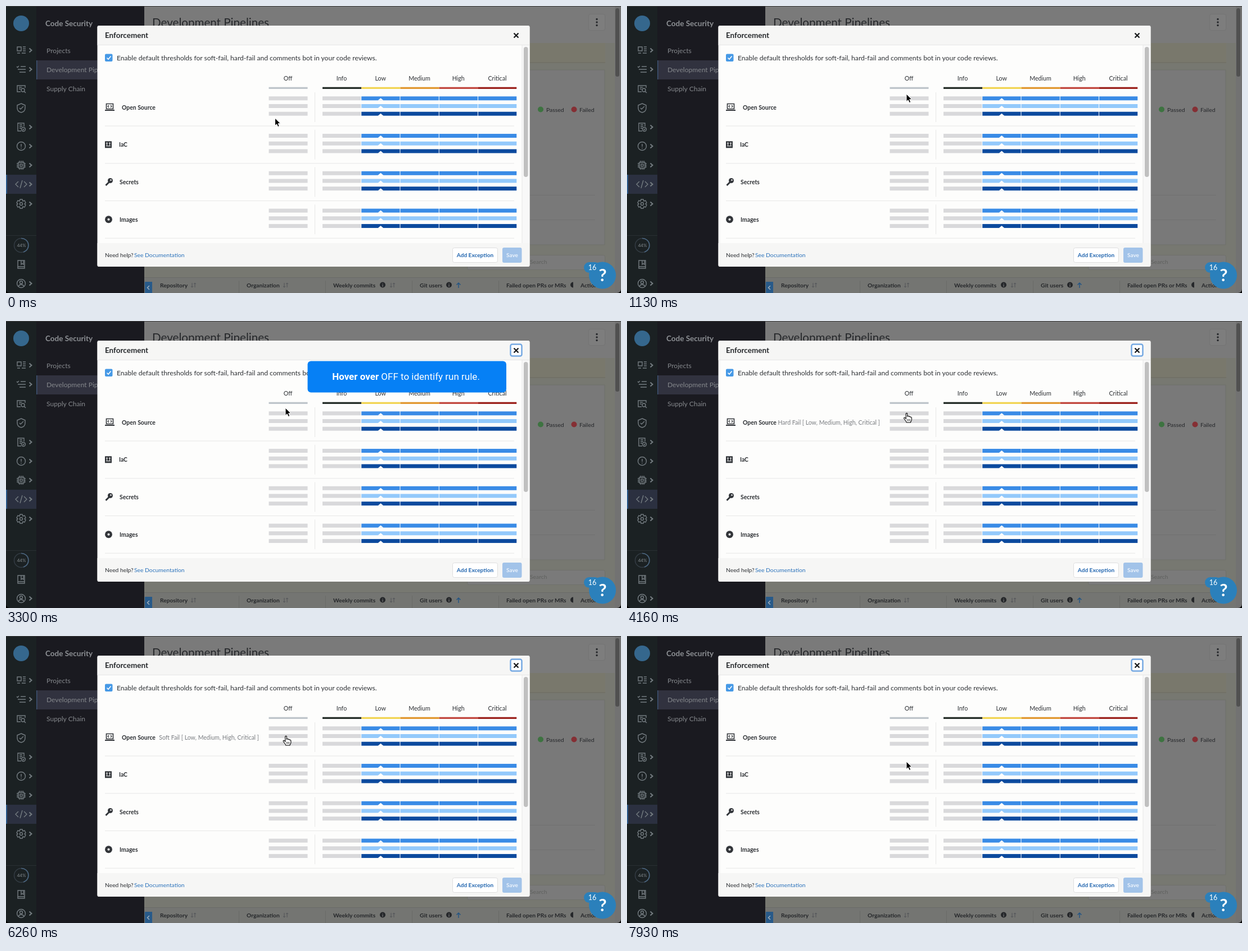
These frames come from a looping animation (1094x512 px, 8000 ms). An HTML page:

```html
<!DOCTYPE html>
<html lang="en">
<head>
<meta charset="utf-8">
<title>Enforcement thresholds</title>
<style>
  html, body { margin: 0; width: 100%; height: 100%; overflow: hidden; background: #000; }
  svg { display: block; width: 100vw; height: 100vh; font-family: Lato, "Open Sans", sans-serif; }
  .icon { fill: none; stroke: #747c81; stroke-width: 1.4; }
</style>
</head>
<body>
<svg id="stage" viewBox="0 0 1094 512" xmlns="http://www.w3.org/2000/svg"></svg>
<script>
const LOOP = 8000;
const stage = document.getElementById('stage');

const rect = (x, y, w, h, fill, extra = '') =>
  `<rect x="${x}" y="${y}" width="${w}" height="${h}" fill="${fill}" ${extra}/>`;
const circle = (x, y, r, fill, extra = '') =>
  `<circle cx="${x}" cy="${y}" r="${r}" fill="${fill}" ${extra}/>`;
const path = (d, extra = '') => `<path d="${d}" ${extra}/>`;
const text = (x, y, size, fill, str, extra = '') =>
  `<text x="${x}" y="${y}" font-size="${size}" fill="${fill}" ${extra}>${str}</text>`;
const bold = 'font-weight="700"';
const middle = 'text-anchor="middle"';
const at = (x, y, body) => `<g transform="translate(${x} ${y})">${body}</g>`;
const stroke = (color, width = 1) => `fill="none" stroke="${color}" stroke-width="${width}"`;

function sidebar() {
  const icons = [
    [79, 1, path('M-7-6H0V1H-7ZM3-6H8M3-2.500H8M3 1H8M-7 5H-2M1 5H8')],
    [113, 1, path('M-8-5l1.500 1.500L-4-6M-1-5H8M-6 0H8M-3 5H8')],
    [148, 0, path('M7-2V-6H-7V5H-1M-4-3H1M-4 0H-1') + circle(3, 2, 3, 'none') + path('M5 4L8 7')],
    [182, 0, path('M0-8L7-5V0C7 4 4 7 0 8C-4 7-7 4-7 0V-5ZM-3 0L-1 2L4-3')],
    [216, 1, path('M5-1V-7H-6V7H0M-3-4H2M-3-1H2M-3 2H0') + circle(4, 4, 3.500, 'none') + path('M2.500 4l1 1 2-2')],
    [250, 1, circle(0, 0, 7.500, 'none') + path('M0-4V1M0 2.700V4.200')],
    [284, 1, rect(-5, -5, 10, 10, 'none') + rect(-2, -2, 4, 4, 'none') +
      path('M-3-8V-5M0-8V-5M3-8V-5M-3 5V8M0 5V8M3 5V8M-8-3H-5M-8 0H-5M-8 3H-5M5-3H8M5 0H8M5 3H8')],
    [318, 1, path('M-5-5L-10 0L-5 5M5-5L10 0L5 5M2-7L-2 7')],
    [353, 1, path('M-2-8H2L3-5L6-6L8-2L6 0L8 2L6 6L3 5L2 8H-2L-3 5L-6 6L-8 2L-6 0L-8-2L-6-6L-3-5Z') + circle(0, 0, 2.500, 'none')],
    [461, 0, path('M-6-7H6V7H-6ZM-6 4H6M0-7V0L2-1.500L4 0V-7')],
    [495, 1, circle(0, 0, 7.500, 'none') + circle(0, -2, 2.500, 'none') + path('M-5 5C-3 1 3 1 5 5')]
  ];
  const chevron = path('M14.500-3.500L18.500 0L14.500 3.500', 'stroke-width="2"');
  return rect(0, 0, 55, 512, '#1b2123') + rect(54, 0, 192, 512, '#1a1a20') +
    rect(0, 301, 54, 34, '#2b3040') + rect(0, 301, 2, 34, '#305d8e') +
    rect(54, 97, 192, 34, '#31323f') + rect(54, 97, 1.500, 34, '#3d5374') +
    rect(0, 409, 54, 1, '#2a3033') +
    circle(27, 31, 14, '#35678d') +
    `<g class="icon">${icons.map(([y, arrow, body]) => at(27, y, body + (arrow ? chevron : ''))).join('')}</g>` +
    circle(27, 427, 12.500, 'none', 'stroke="#343c44" stroke-width="1.500"') +
    path('M27 414.500A12.500 12.500 0 0 1 31 439', stroke('#4b6680', 1.500)) +
    text(27.500, 430, 8, '#83898d', '44%', middle) +
    text(70, 36, 13.500, '#8d9094', 'Code Security', bold) +
    text(72, 84, 12.100, '#85888c', 'Projects') +
    text(72, 118, 12.100, '#85888c', 'Development Pipelines') +
    text(72, 152, 12.100, '#85888c', 'Supply Chain');
}

function page() {
  const ink = '#25272a';
  const sort = x => path(`M${x} 494V502M${x - 2} 500L${x} 502L${x + 2} 500M${x + 5} 502V494M${x + 3} 496L${x + 5} 494L${x + 7} 496`, stroke('#515356'));
  const info = x => circle(x, 497.500, 5, ink) + text(x, 501, 8, '#8a8a8a', 'i', bold + middle.replace(/^/, ' '));
  const head = [[274, 'Repository'], [428, 'Organization'], [582, 'Weekly commits'],
    [736, 'Git users'], [890, 'Failed open PRs or MRs'], [1022, 'Actions']];
  return rect(246, 0, 848, 512, '#777871') + rect(246, 0, 848, 66, '#7a7a7a') +
    rect(246, 66, 820, 35, '#79786c') + rect(246, 100.500, 820, 1, '#6c6b60') +
    rect(260, 114, 805, 312, '#797979', 'stroke="#6f706b"') +
    rect(260, 337, 788, 1, '#717171') + rect(260, 381, 788, 1, '#717171') +
    text(260, 37, 20.600, ink, 'Development Pipelines') +
    rect(1036.500, 14.500, 29, 29, '#7d7d7d', 'rx="3" stroke="#737373"') +
    [23.500, 29, 34.500].map(y => circle(1051, y, 1.700, ink)).join('') +
    circle(951, 184.500, 5, '#3d7340') + text(961, 188.500, 10.400, ink, 'Passed') +
    circle(1010.500, 184.500, 5, '#852f34') + text(1020, 188.500, 10.400, ink, 'Failed') +
    rect(820.500, 444.500, 245, 26, '#7a7a7a', 'rx="3" stroke="#6f706b"') + text(932, 460, 10.400, '#5f605e', 'Search') +
    rect(246, 484, 838, 28, '#747572') + rect(246, 484, 838, 1, '#696a67') +
    [414, 568, 722, 876].map(x => rect(x, 490, 1, 22, '#696a67')).join('') +
    head.map(([x, s]) => text(x, 502, 10.200, ink, s, bold)).join('') +
    sort(331) + sort(495) + sort(685) + info(670) + info(788) +
    path('M805 503V494M801.500 497.500L805 494L808.500 497.500', stroke('#245584', 1.500)) +
    path('M1009 492.500A5 5 0 0 0 1009 502.500Z', `fill="${ink}"`) +
    rect(247, 492, 13, 20, '#285a89') + path('M255 499L251.500 502.500L255 506', stroke('#a0adba', 1.500)) +
    rect(1083, 0, 11, 512, '#727272') + rect(1084, 4, 7, 122, '#505050', 'rx="3.500"');
}

function helpBubble() {
  return circle(1061, 480.500, 24, '#2b80bb') +
    rect(1028, 457, 29, 19, '#2b80bb', 'rx="9.500"') +
    text(1043, 471, 12.500, '#fff', '16', middle) +
    text(1061.500, 491, 31, '#fff', '?', `${bold} ${middle}`);
}

const columns = [['Info', '#202823'], ['Low', '#f1d34e'], ['Medium', '#e0952b'], ['High', '#c0433a'], ['Critical', '#991c17']];
const levels = ['#398be6', '#93c9fb', '#0c4a9e'];
const rows = ['Open Source', 'IaC', 'Secrets', 'Images'];
const rowIcons = [
  path('M178.500 174.500H190.500V183.500H178.500Z', stroke('#33363a', 1.600)) + rect(176, 185, 17, 2, '#33363a') +
    path('M183 177L181 179L183 181M186 177L188 179L186 181', stroke('#33363a', 1.200)),
  rect(176, 174.500, 12, 12, '#33363a') + path('M178 183H186M179.500 182V177M178 178.500L179.500 177L181 178.500M184.500 182V177M183 178.500L184.500 177L186 178.500', stroke('#fff')),
  circle(185.500, 178, 4.500, '#33363a') + path('M184 180L177.500 186.500', stroke('#33363a', 3)) + circle(186.500, 177, 1.300, '#fff'),
  circle(182.500, 180.500, 6.500, '#33363a') + circle(182.500, 180.500, 2, '#fff')
];
const nameX = [206, 201, 202, 202];
const colX = i => 563 + i * 69.250;
const barY = i => 161.300 + i * 13.700;

function thresholdRow(name, r) {
  const bars = levels.map((color, i) => {
    const y = barY(i);
    const cells = columns.map((_, c) => rect(colX(c), y, 68.250, 7, c ? color : '#d9d9db')).join('');
    return rect(467.500, y, 69, 7, '#d9d9db') + cells +
      path(`M661.500 ${y + 7.200}L666.500 ${y + 3}L671.500 ${y + 7.200}Z`, 'fill="#fdfdfd"');
  }).join('');
  return at(0, r * 66.750, rowIcons[r] +
    text(nameX[r], 184.500, 10.400, '#2c2f33', name, bold) + bars +
    rect(549, 154, 1, 53, '#e6e6e6') + rect(176, 213.500, 728, 1, '#e8e8e8'));
}

function modal() {
  return rect(162.500, 35, 769, 430, '#fdfdfc', 'rx="3"') +
    path('M162.500 69.500V38a3 3 0 0 1 3-3H928.500a3 3 0 0 1 3 3V69.500Z', 'fill="#f6f6f5"') +
    rect(162.500, 69, 769, 1, '#e6e6e6') +
    rect(918, 70, 13.500, 353, '#f8f8f8') + rect(917.500, 70, 1, 353, '#e8e8e8') +
    rect(921, 73, 7.500, 232, '#c0c0c0', 'rx="3.750"') +
    text(176, 56.500, 13.500, '#26292c', 'Enforcement', bold) +
    '<rect id="focus" x="897.500" y="41.500" width="20" height="21" rx="3" fill="#fff" stroke="#76a9e2" stroke-width="2.500"/>' +
    path('M903.500 48.500L911.500 56.500M911.500 48.500L903.500 56.500', stroke('#17191b', 2.300)) +
    rect(176, 85.500, 13.500, 13.500, '#4699e6', 'rx="2"') +
    path('M179.500 92.500L182 95L186.500 89.500', stroke('#fff', 1.600)) +
    text(197, 97, 12.100, '#2c2f33', 'Enable default thresholds for soft-fail, hard-fail and comments bot in your code reviews.') +
    text(501.500, 133, 10.700, '#2c2f33', 'Off', middle) + rect(467.500, 144.700, 69, 3.200, '#bcc3c9') +
    columns.map(([name, color], i) => text(colX(i) + 34, 133, 10.700, '#2c2f33', name, middle) +
      rect(colX(i), 144.700, i < 4 ? 69.250 : 68.250, 3.200, color)).join('') +
    rows.map(thresholdRow).join('') +
    text(450, 184.500, 10.500, '#797c80', '', 'id="rule" text-anchor="end"') +
    path('M162.500 423H931.500V462a3 3 0 0 1-3 3H165.500a3 3 0 0 1-3-3Z', 'fill="#f6f6f5"') +
    text(176, 448, 10.300, '#2c2f33', 'Need help?') + text(228, 448, 10.300, '#2b72bb', 'See Documentation') +
    rect(794.500, 431.500, 80, 26, '#fff', 'rx="3" stroke="#dedede"') +
    text(834.500, 448, 10.100, '#2467b0', 'Add Exception', `${bold} ${middle}`) +
    rect(883, 431, 34.500, 27, '#a2c3e9', 'rx="3"') +
    text(900.500, 448, 10, '#edf4fc', 'Save', `${bold} ${middle}`);
}

const tooltip = `<g id="tip">${rect(536.500, 71.500, 353.500, 56, '#0680f5', 'rx="6"')}` +
  text(711.500, 104.500, 17, '#fff', '<tspan font-weight="700">Hover over</tspan> OFF to identify run rule.',
    `${middle} font-family="Roboto, Arial, sans-serif"`) + '</g>';

const pointer = '<g id="arrow">' +
  path('M0 0V13.500L3.100 10.700L5.200 15.500L7.700 14.400L5.600 9.700H9.800Z', 'fill="#000" stroke="#fff" stroke-width="1"') +
  '</g><g id="hand">' +
  path('M-1.300 1.200C-1.300-.6 1.300-.6 1.300 1.200V5.500C2 4.500 3.800 4.800 4 6C4.800 5.300 6.400 5.700 6.500 7C7.500 6.500 8.800 7 8.800 8.300V11.500C8.800 14 7 14.300 7 16.500H-.2C-.5 14-4.500 11-4.900 9C-5 7.600-3.300 7.400-2.400 8.600L-1.300 9.800Z',
    'fill="#fff" stroke="#000" stroke-width="1.100"') +
  path('M1.300 10.500V14M3.500 10.500V14M5.700 10.500V14', stroke('#000', .8)) + '</g>';

stage.innerHTML = page() + sidebar() + modal() + helpBubble() + tooltip + `<g id="cursor">${pointer}</g>` +
  path('M0 505V512H7A7 7 0 0 1 0 505ZM1094 505V512H1087A7 7 0 0 0 1094 505Z', 'fill="#000"') +
  path('M0 .5H1094', stroke('#3c3c3c'));

const part = Object.fromEntries(['focus', 'rule', 'tip', 'cursor', 'arrow', 'hand']
  .map(id => [id, document.getElementById(id)]));
const show = (el, on) => el.setAttribute('visibility', on ? 'visible' : 'hidden');

// time, x, y of the pointer's hot spot
const track = [
  [0, 478.5, 200], [150, 478.5, 200], [950, 497, 157], [1130, 497, 157], [1600, 498, 160],
  [2700, 498, 160], [3200, 497, 155], [3650, 497, 155], [3950, 497.5, 164.5], [5100, 497.5, 164.5],
  [5450, 498, 178.5], [6750, 498, 178.5], [7050, 498, 192], [7620, 498, 192], [7900, 497, 224], [LOOP, 497, 224]
];
const ruleNames = ['Hard Fail', 'Soft Fail', 'Comments Bot'];

function pointerAt(t) {
  const i = track.findIndex(key => key[0] > t);
  const [t0, x0, y0] = track[i - 1], [t1, x1, y1] = track[i];
  const u = (t - t0) / (t1 - t0), k = u * u * (3 - 2 * u);
  return [x0 + (x1 - x0) * k, y0 + (y1 - y0) * k];
}

function render(t) {
  const [x, y] = pointerAt(t);
  const hovered = t < 3500 ? -1 : levels.findIndex((_, i) => y >= barY(i) && y <= barY(i) + 7);
  part.cursor.setAttribute('transform', `translate(${x} ${y})`);
  show(part.arrow, hovered < 0);
  show(part.hand, hovered >= 0);
  part.rule.textContent = hovered < 0 ? '' : `${ruleNames[hovered]} [ Low, Medium, High, Critical ]`;
  show(part.tip, t >= 1560 && t < 3700);
  show(part.focus, t >= 2800);
}

const start = performance.now();
function frame() {
  render((performance.now() - start) % LOOP);
  requestAnimationFrame(frame);
}
frame();
</script>
</body>
</html>
```
